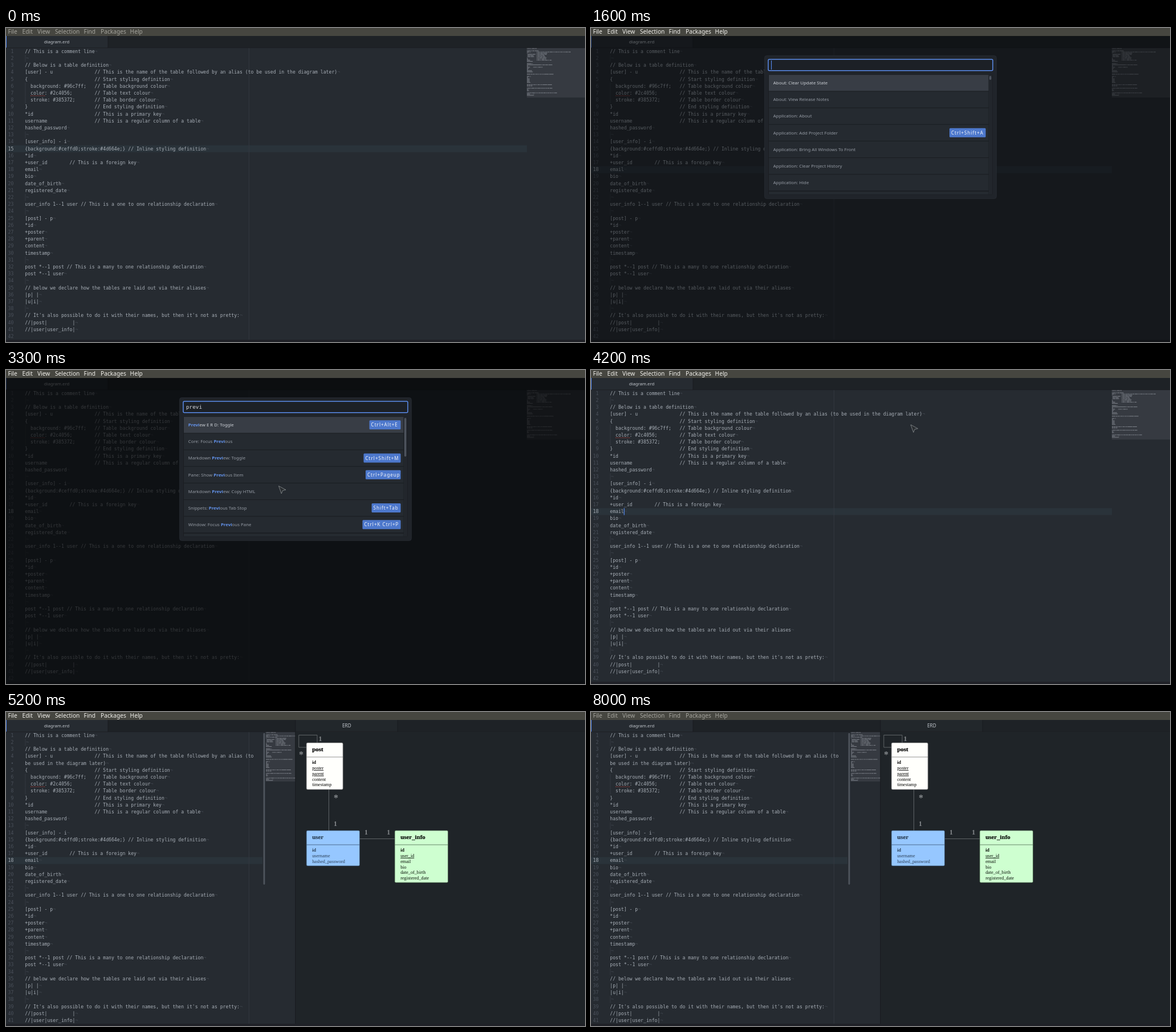
Animation of 1016 by 551 pixels, one loop 8200 ms. Source, as an HTML page:

```html
<!DOCTYPE html>
<html lang="en">
<head>
<meta charset="utf-8">
<title>Diagram editor</title>
<style>
html, body { margin: 0; width: 100%; height: 100%; overflow: hidden; background: #262b31; }
svg { display: block; width: 1016px; height: 551px; }
text { white-space: pre; }
.ui { font-family: "Noto Sans", sans-serif; }
.mono { font-family: "DejaVu Sans Mono", monospace; }
.serif { font-family: "Liberation Serif", serif; }
</style>
</head>
<body>
<svg id="stage" viewBox="0 0 1016 551"></svg>
<script>
const LOOP = 8200, TOP = 35, ROW = 12.2, LEFT = 33.3;
const CHAR = 8.15;

const code = `// This is a comment line

// Below is a table definition
[user] - u               // This is the name of the table followed by an alias (to be used in the diagram later)
{                        // Start styling definition
  background: #96c7ff;   // Table background colour
  color: #2c4056;        // Table text colour
  stroke: #385372;       // Table border colour
}                        // End styling definition
*id                      // This is a primary key
username                 // This is a regular column of a table
hashed_password

[user_info] - i
{background:#ceffd0;stroke:#4d664e;} // Inline styling definition
*id
+user_id        // This is a foreign key
email
bio
date_of_birth
registered_date

user_info 1--1 user // This is a one to one relationship declaration

[post] - p
*id
+poster
+parent
content
timestamp

post *--1 post // This is a many to one relationship declaration
post *--1 user

// below we declare how the tables are laid out via their aliases
|p| |
|u|i|

// It's also possible to do it with their names, but then it's not as pretty:
//|post|         |
//|user|user_info|
`.split("\n");

const menu = [["File", 3.4], ["Edit", 28.6], ["View", 55], ["Selection", 86], ["Find", 136.6], ["Packages", 166], ["Help", 217.6]];

const startItems = [["About: Clear Update State"], ["About: View Release Notes"], ["Application: About"],
  ["Application: Add Project Folder", "Ctrl+Shift+A", 629], ["Application: Bring All Windows To Front"],
  ["Application: Clear Project History"], ["Application: Hide"]];
const foundItems = [["Preview E R D: Toggle", "Ctrl+Alt+E", 637.6], ["Core: Focus Previous"],
  ["Markdown Preview: Toggle", "Ctrl+Shift+M", 627.5], ["Pane: Show Previous Item", "Ctrl+Pageup", 631],
  ["Markdown Preview: Copy HTML"], ["Snippets: Previous Tab Stop", "Shift+Tab", 641.6],
  ["Window: Focus Previous Pane", "Ctrl+K Ctrl+P", 625.5]];

const query = "previ";
const keyTimes = [2300, 2500, 2700, 2900, 3000];
const thumbs = [7, 12, 26, 42, 55, 68];

// [time, shape, x, y]; no shape means hidden
const path = [[0], [500, "beam", 479, 247], [1500, "beam", 479, 247], [1600],
  [3100, "arrow", 479, 247], [3200, "arrow", 479, 247], [3300, "arrow", 478.5, 203.5], [3500, "arrow", 490, 190],
  [4000, "arrow", 561, 96], [4900, "arrow", 561, 96], [5000],
  [5800, "arrow", 563, 98], [6000, "arrow", 530, 180], [6100, "beam", 488, 300], [6200, "beam", 469, 369],
  [6400, "beam", 455, 259], [6900, "beam", 455, 259], [7000, "beam", 300, 140],
  [7100, "arrow", 158, 23], [7200, "arrow", 158, 23], [7300]];

const editorBlinks = [600, 900, 1200, 1600, 4200, 5200, 5400, 5800, 6200, 6600, 7000, 7300, 7400, 7800];
const inputBlinks = [1600, 3300, 3700, 4100];

const esc = s => s.replace(/&/g, "&amp;").replace(/</g, "&lt;");
const text = (x, y, s, size, fill, cls, more = "") =>
  `<text x="${x}" y="${y}" font-size="${size}" fill="${fill}" class="${cls}" ${more}>${s}</text>`;
const rect = (x, y, w, h, fill, more = "") =>
  `<rect x="${x}" y="${y}" width="${w}" height="${h}" fill="${fill}" ${more}/>`;
const line = (d, stroke, w = 1, more = "") =>
  `<path d="${d}" fill="none" stroke="${stroke}" stroke-width="${w}" ${more}/>`;

function minimap(rows, x, right) {
  let out = rect(x, TOP, right - x, 87, "#363a41");
  rows.forEach(([, s], i) => {
    for (const m of s.matchAll(/\S+/g)) {
      const x0 = x + m.index * .687;
      const w = Math.min(m[0].length * .687, right - x0);
      if (w > 0) out += rect(x0, TOP + .4 + i * 2.05, w, 1.1, "#a5abb3", 'opacity=".6"');
    }
  });
  return out;
}

function editor(id, rows, mapX, right, lineEnd) {
  let out = rect(0, TOP, right, 516, "#262b31");
  out += rect(0, 0, lineEnd, ROW, "#2a333a", `id="${id}-line"`);
  out += rect(425.8, TOP, 1, 512, "#343940");
  rows.forEach(([num, s, wrapped], i) => {
    const y = TOP + 8.7 + i * ROW;
    out += text(13.4, y, num, CHAR, "#4a505a", "mono", `text-anchor="end" data-num="${num}"`);
    const eol = wrapped || num === 42 ? "" : '<tspan fill="#3f454d">¬</tspan>';
    const guide = (!s && num !== 42) || s.startsWith("  ");
    if (guide) out += rect(33.6, TOP + i * ROW, .7, ROW, "#3a4047");
    out += text(s ? LEFT : LEFT + 1.5, y, esc(s) + eol, CHAR, "#a7aeb6", "mono");
    if (s.startsWith("  color")) out += line(`M43 ${y + 2}h26`, "#c24038", 1, 'stroke-dasharray="1.2 1.2"');
  });
  return out + rect(57.6, 0, 1.2, ROW, "#568af2", `id="${id}-caret"`) + minimap(rows, mapX, right);
}

function tabs(split) {
  let out = rect(0, 14, 1016, 21, "#1e2226") + rect(0, 14, 179, 21, "#262b31") +
    rect(0, 14, 1, 21, "#568af2") + rect(178.6, 14, .8, 21, "#181a1f") +
    text(89, 27.3, "diagram.erd", 7.7, "#c3c8ce", "ui", 'text-anchor="middle"');
  if (split) out += rect(508, 14, 179, 21, "#22272b") + rect(686.6, 14, .8, 21, "#181a1f") +
    text(597.8, 27.3, "ERD", 8.2, "#c3c8ce", "ui", 'text-anchor="middle"');
  return out + rect(0, 34.5, 1016, .7, "#1a1c20");
}

function table(x, y, w, h, name, cols, fill, stroke, ink) {
  let out = rect(x, y, w, h, fill, `rx="2" stroke="${stroke}" stroke-width=".7"`);
  out += line(`M${x} ${y + 25}h${w}`, stroke, .8);
  out += text(x + 10, y + 15, name, 10.9, ink, "serif", `font-weight="700" stroke="${ink}" stroke-width=".2"`);
  cols.forEach((c, i) => {
    const more = i === 0 ? 'font-weight="700"' : c[0] === "+" ? 'text-decoration="underline"' : "";
    out += text(x + 10, y + 37.2 + i * 9.8, c.replace("+", ""), 8.2, ink, "serif", more);
  });
  return out;
}

function diagram() {
  const mark = (x, y, s) => text(x, y + (s === "*" ? 7.5 : 4), s, s === "*" ? 16 : 12, "#85898c", "serif",
    'text-anchor="middle" font-weight="700"');
  return rect(508, TOP, 508, 516, "#1f2428") + rect(507.3, 14, 1, 537, "#181a1f") +
    line("M546 54V40.5H513.8V62H527M566.5 136V208M620 222.5H682", "#676b6e", .9) +
    mark(551.5, 47, "1") + mark(518, 72, "*") + mark(579, 148, "*") + mark(578, 196, "1") +
    mark(632, 210.5, "1") + mark(671.3, 210.5, "1") +
    table(527.2, 54, 64, 82, "post", ["id", "+poster", "+parent", "content", "timestamp"], "#fffffc", "#777", "#000") +
    table(527.2, 208, 93.4, 62, "user", ["id", "username", "hashed_password"], "#96c7ff", "#385372", "#2c4056") +
    table(682.2, 208, 93.4, 91.3, "user_info", ["id", "+user_id", "email", "bio", "date_of_birth", "registered_date"],
      "#ceffd0", "#4d664e", "#0a0f0a");
}

function list(typed) {
  const items = typed ? foundItems : startItems;
  return items.map(([label, keys, kx], i) => {
    const mid = 96.2 + i * 29.17;
    let s = label;
    if (typed) {
      const at = label.toLowerCase().indexOf(query);
      s = `${label.slice(0, at)}<tspan fill="#6494ed" font-weight="700">${label.slice(at, at + typed)}</tspan>${label.slice(at + typed)}`;
    }
    let out = rect(312, mid - 14, 385.6, 28.2, i ? "#252a30" : "#383d45");
    out += text(319.8, mid + 2.8, s, 7.85, i ? "#959ba4" : "#cdd1d7", "ui");
    if (keys) out += rect(kx, mid - 8, 692.6 - kx, 16, "#4d78cc", 'rx="1.5"') +
      text(kx + 3, mid + 3, keys, 8.05, "#f4f6fa", "ui", 'letter-spacing="1"');
    return out;
  }).join("") + rect(312, 287, 385.6, 5, "#252a30") +
    rect(699, 84, 3.4, thumbs[typed], "#4d535d", 'rx="1.7"');
}

const full = code.map((s, i) => [i + 1, s]);
const cut = code[3].indexOf("be used");
const split = [...full.slice(0, 3), [4, code[3].slice(0, cut), true], ["•", code[3].slice(cut)], ...full.slice(4, 41)];

const stage = document.getElementById("stage");
stage.innerHTML =
  `<g id="full">${editor("a", full, 914, 1016, 914)}${tabs(false)}</g>
  <g id="split">${editor("b", split, 456, 508, 450)}${rect(451.6, 37, 2.8, 266, "#4f555d", 'rx="1.4"')}
    <g id="gear">${rect(489.5, 39, 9, 9, "#5a6068", 'rx="2"')}<circle cx="494" cy="43.5" r="2.5" fill="none" stroke="#8b9098"/></g>
    ${tabs(true)}${diagram()}</g>
  ${rect(0, 547, 1016, 4, "#1f2127")}
  ${rect(0, 14, 1016, 537, "#050608", 'id="dim"')}
  <g id="palette">
    ${rect(304.5, 48.5, 407, 251, "#20242a", 'rx="4" stroke="#2b3037" stroke-width=".6"')}
    ${rect(311, 55, 394, 19.8, "#1c2026", 'rx="2" stroke="#5b8cec" stroke-width="1.5"')}
    ${rect(311.2, 81.4, 393.4, 211, "#191c20", 'rx="1.5"')}${rect(698, 82, 6, 210, "#22262c")}
    ${text(316, 68, "", 9.3, "#d7dae0", "mono", 'id="query"')}
    ${rect(316, 57, 1.1, 16, "#568af2", 'id="input-caret"')}
    <g id="list"></g>
  </g>
  ${rect(0, 0, 1016, 14, "#464640")}
  <g id="menu">${menu.map(([s, x]) => text(x, 9.8, s, 10.2, "currentColor", "ui")).join("")}</g>
  <g id="arrow"><path d="M0 0L12.5 6.8L7 8L4.8 13.5Z" fill="#2a2e31" stroke="#8d9295" stroke-width=".8" stroke-linejoin="round"/></g>
  <g id="beam">${line("M-3 -5.5H3M-3 5.5H3M0 -5.5V5.5", "#c9cdd0", 2.2)}${line("M-2.5 -5.5H2.5M-2.5 5.5H2.5M0 -5.5V5.5", "#1d2023", 1)}</g>`;

const $ = id => document.getElementById(id);
const show = (id, on) => $(id).setAttribute("visibility", on ? "inherit" : "hidden");
const blink = (times, t) => times.filter(k => k <= t).length % 2 === 1;

function placeMouse(t) {
  const i = path.findLastIndex(p => p[0] <= t);
  const [t0, shape, x0, y0] = path[i], next = path[i + 1];
  show("arrow", shape === "arrow");
  show("beam", shape === "beam");
  if (!shape) return;
  const k = next && next[1] ? (t - t0) / (next[0] - t0) : 0;
  const x = k ? x0 + (next[2] - x0) * k : x0, y = k ? y0 + (next[3] - y0) * k : y0;
  $(shape).setAttribute("transform", `translate(${x} ${y})`);
}

function placeLine(id, row, num) {
  const y = TOP + (row - 1) * ROW;
  $(id + "-line").setAttribute("y", y);
  $(id + "-caret").setAttribute("y", y);
  for (const el of $(id === "a" ? "full" : "split").querySelectorAll("[data-num]"))
    el.setAttribute("fill", el.dataset.num === String(num) ? "#a7aeb6" : "#4a505a");
}

let typedShown = -1;
function draw(t) {
  const isSplit = t >= 4300, open = t >= 1600 && t < 4200, dimmed = open && t >= 1700;
  const typed = keyTimes.filter(k => k <= t).length;
  show("full", !isSplit);
  show("split", isSplit);
  show("gear", isSplit && t >= 6100 && t < 6400);

  const caret = blink(editorBlinks, t), row = t < 600 ? 15 : 18;
  placeLine("a", row, row);
  placeLine("b", 19, 18);
  show("a-caret", caret && !isSplit);
  show("b-caret", caret && isSplit);
  show("a-line", !isSplit && !dimmed);

  show("dim", open);
  $("dim").setAttribute("opacity", dimmed ? .7 : .5);
  show("palette", open);
  show("input-caret", open && blink(inputBlinks, t));
  $("input-caret").setAttribute("x", 316 + typed * 5.6);
  if (typed !== typedShown) {
    $("query").textContent = query.slice(0, typed);
    $("list").innerHTML = list(typed);
    typedShown = typed;
  }
  $("menu").setAttribute("color", t >= 500 && t < 8000 ? "#f2f1ec" : "#a5a49d");
  placeMouse(t);
}

let last = -1;
function tick() {
  const t = Math.floor(performance.now() % LOOP / 100) * 100;
  if (t !== last) draw(last = t);
  requestAnimationFrame(tick);
}
tick();
</script>
</body>
</html>
```
